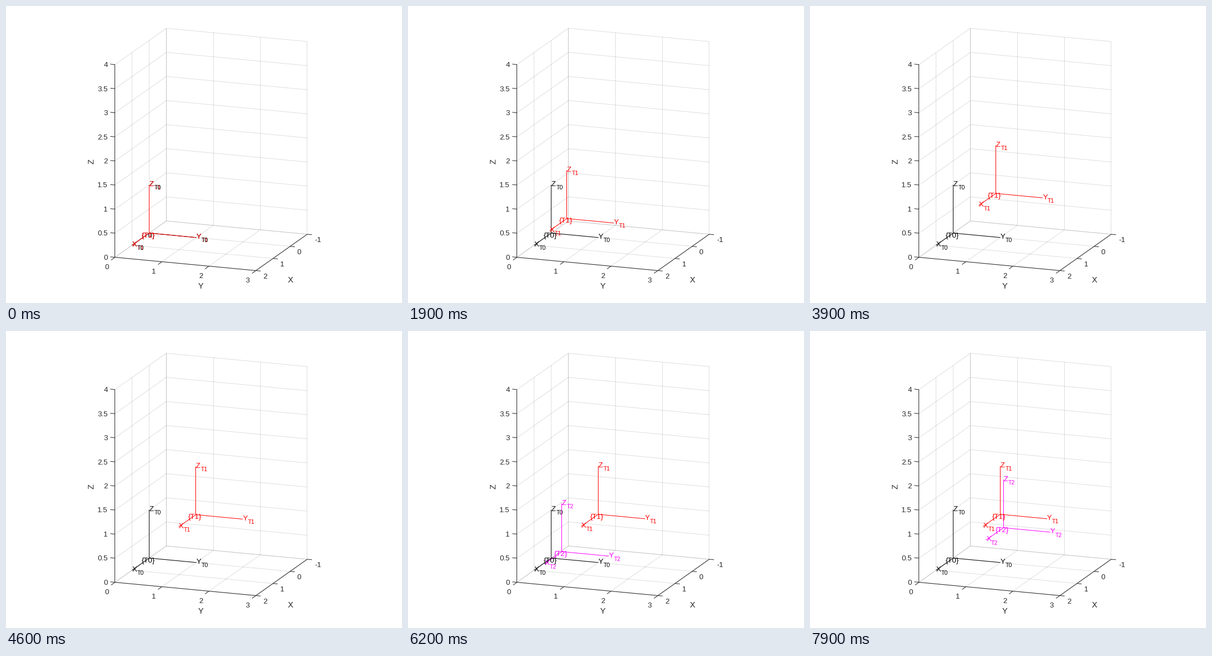
Animation, 715 px wide and 536 px high, one loop 8 s. Source, as a matplotlib script:

```python
import numpy as np
import matplotlib.pyplot as plt
from matplotlib.animation import FuncAnimation

W, H, DPI = 715, 536, 64
PT = 72 / DPI                      # points per pixel
STEPS = 50                         # frames per move
INK = "#262626"

plt.rcParams["font.family"] = "Liberation Sans"
plt.rcParams["path.snap"] = False
fig = plt.figure(figsize=(W / DPI, H / DPI), dpi=DPI, facecolor="white")
ax = fig.add_axes([0, 0, 1, 1])
ax.set(xlim=(-0.5, W - 0.5), ylim=(H - 0.5, -0.5))
ax.axis("off")

ORIGIN = np.array([258.1, 409.3])
BASIS = np.array([[-30.9, 21.85], [84.8, 8.0], [0, -86.95]])


def project(x, y, z):
    return ORIGIN + np.array([x, y, z]) @ BASIS


def ends(a, b):
    """Line data, with upright lines centred on a pixel column."""
    xs = np.array([a[0], b[0]])
    if abs(xs[1] - xs[0]) < 1e-6:
        xs = np.round(xs)
    return xs, [a[1], b[1]]


def line(a, b, color=INK, **kw):
    return ax.plot(*ends(a, b), color=color, lw=PT,
                   solid_capstyle="butt", **kw)[0]


def label(x, y, s, size=13.3, color=INK, **kw):
    return ax.text(x, y, s, fontsize=size * PT, color=color, **kw)


def grid(a, b):
    line(project(*a), project(*b), alpha=0.15, zorder=1)


def draw_box():
    xs, ys, zs = range(-1, 3), range(4), np.arange(0, 4.1, 0.5)
    for x in xs:
        grid((x, 0, 0), (x, 3, 0))
        grid((x, 0, 0), (x, 0, 4))
    for y in ys:
        grid((-1, y, 0), (2, y, 0))
        grid((-1, y, 0), (-1, y, 4))
    for z in zs:
        grid((-1, 0, z), (2, 0, z))
        grid((-1, 0, z), (-1, 3, z))

    corner, right = project(2, 0, 0), project(2, 3, 0)
    line(project(2, 0, 4), corner)
    line(corner, right)
    line(right, project(-1, 3, 0))

    for z in zs:
        p = project(2, 0, z)
        line(p, p + (-8.5, -0.8))
        label(p[0] - 13, p[1] + 4.4, f"{z:g}", ha="right")
    for y in ys:
        p = project(2, y, 0)
        line(p, p + (-7, 5))
        label(p[0] - 11, p[1] + 21.4, str(y), ha="right")
    for x in xs:
        p = project(x, 3, 0)
        line(p, p + (8.5, 0.8))
        label(p[0] + 13, p[1] + 14.4, str(x))

    mid = dict(ha="center", va="center")
    label(154, 279.8, "Z", 14.6, rotation=90, **mid)
    label(351, 505.8, "Y", 14.6, **mid)
    label(513, 494.8, "X", 14.6, **mid)


class Triad:
    """Labelled coordinate frame with unit axes."""

    def __init__(self, name, color, z, sub_z):
        self.axes = [line((0, 0), (0, 0), color, zorder=z) for _ in "XYZ"]
        self.heads = [label(0, 0, c, color=color, zorder=z) for c in "XYZ"]
        self.subs = [label(0, 0, name, 10.6, color, zorder=sub_z) for _ in "XYZ"]
        self.tag = label(0, 0, "{%s}" % name, color=color, ha="center", zorder=z)
        self.parts = [*self.axes, *self.heads, *self.subs, self.tag]

    def move(self, shift):
        o = ORIGIN + shift
        self.tag.set_position(o + (-2.0, 7.8))
        for vec, axis, head, sub in zip(BASIS, self.axes, self.heads, self.subs):
            tip = o + vec
            axis.set_data(*ends(o, tip))
            head.set_position(tip + (0, 2.4))
            sub.set_position(tip + (8.9, 8.6))

    def show(self, on):
        for p in self.parts:
            p.set_visible(on)


def blend(k):
    """Constant speed with parabolic ends, 0 to 1 over one move."""
    u = np.clip(k / (STEPS - 1), 0, 1)
    if u < 1 / 3:
        return 2.25 * u * u
    if u > 2 / 3:
        return 1 - 2.25 * (1 - u) ** 2
    return 1.5 * u - 0.25


draw_box()
base = Triad("T0", "black", 4, 6)
first = Triad("T1", "red", 5, 5)
second = Triad("T2", "magenta", 3, 3)
base.move(np.zeros(2))

FIRST_SHIFT = np.array([0, 1, 1]) @ BASIS
SECOND_SHIFT = np.array([142.0, -85.8])


def update(i):
    first.move(blend(i) * FIRST_SHIFT)
    second.move(blend(i - STEPS) * SECOND_SHIFT)
    second.show(i >= STEPS)
    return first.parts + second.parts


anim = FuncAnimation(fig, update, frames=80, interval=100, repeat=True,
                     repeat_delay=0, init_func=lambda: update(0), blit=False)
plt.show()
```
